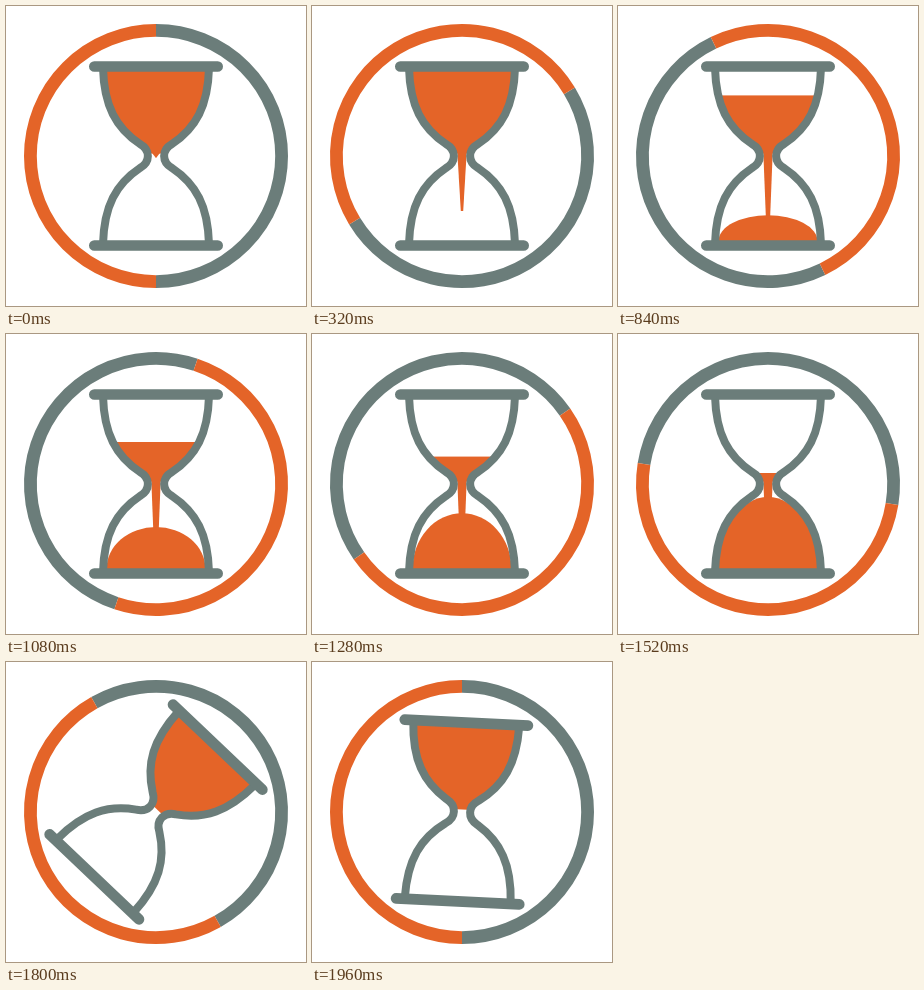
These frames come from a looping animation (300x300 px, 2 s). An HTML page with a canvas:

```html
<!DOCTYPE html>
<html lang="en">
<head>
<meta charset="utf-8">
<title>Hourglass</title>
<style>
html, body { margin: 0; width: 100%; height: 100%; overflow: hidden; background: #fff; }
canvas { display: block; width: 300px; height: 300px; }
</style>
</head>
<body>
<canvas id="stage"></canvas>
<script>
const LOOP = 2000, STEP = 40, TURN_START = 1579, TURN_END = 2014;
const ORANGE = '#e46428', GRAY = '#6b7d7a';
const canvas = document.getElementById('stage');
const ctx = canvas.getContext('2d');
const dpr = window.devicePixelRatio || 1;
canvas.width = canvas.height = 300 * dpr;

const LEFT = 'M97 62C98 100 110 122 134 138C144.5 144 144.5 156 134 162C110 178 98 200 97 238';
const RIGHT = 'M203 62C202 100 190 122 166 138C155.5 144 155.5 156 166 162C190 178 202 200 203 238';
const walls = new Path2D(LEFT + RIGHT);
const inside = new Path2D(LEFT + 'L203 238C202 200 190 178 166 162C155.5 156 155.5 144 166 138C190 122 202 100 203 62Z');

function arc(from, to, color) {
  ctx.beginPath();
  ctx.arc(150, 150, 125.6, from, to);
  ctx.lineWidth = 12.8;
  ctx.strokeStyle = color;
  ctx.stroke();
}

function ring(t) {
  const lead = 2 * Math.PI * t / (LOOP - STEP) - Math.PI / 2;
  arc(lead, lead + Math.PI, GRAY);
  arc(lead - Math.PI, lead, ORANGE);
}

function upperSand(level) {
  if (level < 147.5) ctx.fillRect(90, level, 120, 147.5 - level);
}

function stream(t) {
  const tip = Math.min(235, 152 + 0.1656 * t);
  const end = Math.min(1.2, (tip - 150) / 20);
  ctx.beginPath();
  ctx.moveTo(145.3, 146);
  ctx.lineTo(154.7, 146);
  ctx.lineTo(150 + end, tip);
  ctx.lineTo(150 - end, tip);
  ctx.fill();
}

function pile(t) {
  const height = (t - 464) * 0.0682;
  if (height <= 0) return;
  ctx.beginPath();
  ctx.ellipse(150, 235, 49.5, height, 0, Math.PI, 2 * Math.PI);
  ctx.fill();
}

function glass() {
  ctx.strokeStyle = GRAY;
  ctx.lineCap = 'butt';
  ctx.lineWidth = 8;
  ctx.stroke(walls);
  ctx.lineCap = 'round';
  ctx.lineWidth = 10.6;
  ctx.beginPath();
  for (const y of [60.5, 239.5]) {
    ctx.moveTo(88.3, y);
    ctx.lineTo(211.7, y);
  }
  ctx.stroke();
  ctx.lineCap = 'butt';
}

function hourglass(t) {
  const turning = t > TURN_START;
  ctx.save();
  if (turning) {
    const left = (TURN_END - t) / (TURN_END - TURN_START);
    ctx.translate(150, 150);
    ctx.rotate(Math.PI * left * left);
    ctx.translate(-150, -150);
  }
  ctx.save();
  ctx.clip(inside);
  ctx.fillStyle = ORANGE;
  if (turning) {
    upperSand(60);
  } else {
    const k = (t - 640) / 440;
    upperSand(Math.max(60, 73 + 37 * k - 2 * k * k));
    stream(t);
    pile(t);
  }
  ctx.restore();
  glass();
  ctx.restore();
}

function draw(now) {
  const t = Math.floor(now % LOOP / STEP) * STEP;
  ctx.setTransform(dpr, 0, 0, dpr, 0, 0);
  ctx.fillStyle = '#fff';
  ctx.fillRect(0, 0, 300, 300);
  ring(t);
  hourglass(t);
}

const start = performance.now();
function tick() {
  draw(performance.now() - start);
  requestAnimationFrame(tick);
}
tick();
</script>
</body>
</html>
```
